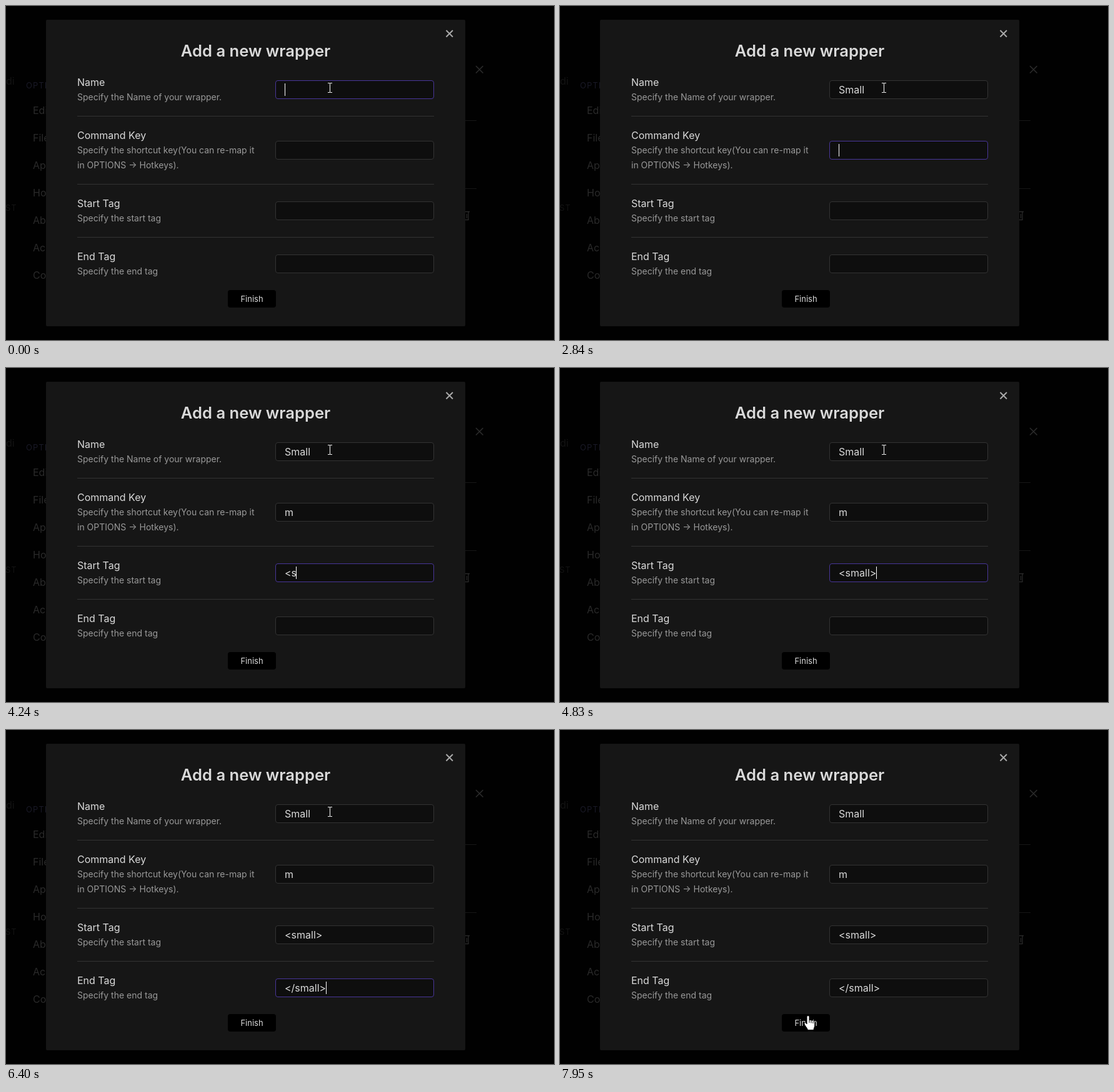
Write an HTML page that moves like this. It is 877 px wide and 535 px high and loops after 8000 ms.

```html
<!DOCTYPE html>
<html lang="en">
<head>
<meta charset="utf-8">
<title>Add a new wrapper</title>
<style>
  html, body { margin: 0; width: 100%; height: 100%; overflow: hidden; background: #010101; }
  svg { display: block; font: 16px Inter, sans-serif; fill: #dadada; }
  text { white-space: pre; }
  .title { font-size: 25.6px; font-weight: 600; }
  .note { font-size: 14px; fill: #999; }
  .line { fill: none; stroke: #333; }
  .field { fill: #0e0e0e; stroke: #333; }
  .focus { stroke: #483699; }
  .back text { fill: #2a2a2a; }
  .back .head { font-size: 13px; letter-spacing: 1px; fill: #191926; }
  .back .faint { fill: #131313; }
  .back path { fill: none; stroke: #2a2a2a; }
  .back .rule { stroke: #171717; }
  .cursor path { fill: #fff; stroke: #000; stroke-linejoin: round; }
</style>
</head>
<body>
<svg width="877" height="535" viewBox="0 0 877 535">
  <g class="back" id="back">
    <text class="faint" x="0" y="126">di</text>
    <text class="head" x="32" y="132">OPTIONS</text>
    <text class="head faint" x="-1" y="328">ST</text>
    <path class="rule" d="M735 183.5H753M735 292.5H753"/>
    <path stroke-width="1.7" d="M752 96l11.500 11.500M763.500 96L752 107.500"/>
    <path stroke-width="1.300" d="M725 329.500H742M727 330V342.500H740V330M737.500 333V340"/>
  </g>
  <rect x="64" y="22" width="671" height="491" rx="2" fill="#161616"/>
  <path d="M704.500 39l10.500 10.500M715 39L704.500 49.500" stroke="#aaa" stroke-width="2"/>
  <text class="title" x="399.500" y="81" text-anchor="middle">Add a new wrapper</text>
  <g id="form"></g>
  <rect x="355" y="455" width="77" height="28" rx="4" fill="#000"/>
  <text x="393.500" y="474" text-anchor="middle" font-size="13">Finish</text>
  <rect id="caret" width="1" height="20" fill="#fff"/>
  <g class="cursor">
    <g id="beam">
      <path stroke="none" style="stroke:none" d="M-3-8H0L.5-7 1-8H4V-7H1V7H4V8H1L.5 7 0 8H-3V7H0V-7H-3z"/>
    </g>
    <g id="arrow">
      <path d="M0 0V16.500L3.700 13 6.200 18.800 8.800 17.700 6.300 12H11.500z"/>
    </g>
    <g id="hand">
      <path d="M-2 1.500a2 2 0 0 1 4 0V7a1.800 1.800 0 0 1 3 .5 1.800 1.800 0 0 1 3 .8 1.600 1.600 0 0 1 2.800 1.300V15c0 3-1.800 4-1.800 7.500H-.5C-1 19.500-6 15-6.200 12c-.1-1.500 2-2 3-.6L-2 13z"/>
      <path d="M2 7v4M5 8v3.500M8 9v3"/>
    </g>
  </g>
</svg>
<script>
const LOOP = 8000, TEXT_X = 446;
const $ = id => document.getElementById(id);

function add(parent, tag, attrs, text = '') {
  const el = document.createElementNS('http://www.w3.org/2000/svg', tag);
  for (const name in attrs) el.setAttribute(name, attrs[name]);
  el.textContent = text;
  return parent.appendChild(el);
}

['Editor', 'Files', 'Appearance', 'Hotkeys', 'About', 'Account', 'Core'].forEach((label, i) =>
  add($('back'), 'text', { x: 43, y: 173 + 44 * i }, label));

const fields = [
  { y: 128, box: 119, value: 'Small', label: 'Name', notes: ['Specify the Name of your wrapper.'] },
  { y: 213, box: 216, value: 'm', label: 'Command Key',
    notes: ['Specify the shortcut key(You can re-map it', 'in OPTIONS → Hotkeys).'] },
  { y: 322, box: 313, value: '<small>', label: 'Start Tag', notes: ['Specify the start tag'] },
  { y: 407, box: 398, value: '</small>', label: 'End Tag', notes: ['Specify the end tag'] }
];

fields.forEach((f, i) => {
  const form = $('form');
  add(form, 'text', { x: 114, y: f.y }, f.label);
  f.notes.forEach((note, n) => add(form, 'text', { class: 'note', x: 114, y: f.y + 23 + 24 * n }, note));
  if (i) add(form, 'path', { class: 'line', d: `M114 ${f.y - 36.5}H685` });
  f.rect = add(form, 'rect', { class: 'field', x: 431.5, y: f.box + .5, width: 253, height: 29, rx: 3.5 });
  f.text = add(form, 'text', { x: TEXT_X, y: f.box + 21 });
});

// Steps: time, focused field, characters typed, caret shown
const typing = (field, start, gap, counts) => counts.map((n, i) => [start + gap * i, field, n, true]);
const steps = [
  [0, 0, 0, true], [310, 0, 0, false],
  [720, 0, 1, true], [1000, 0, 2, true], [1160, 0, 4, true], [1440, 0, 5, true],
  [1720, 1, 0, true], [2280, 1, 0, false], [2840, 1, 0, true], [3250, 1, 1, true],
  [3560, 2, 0, true], ...typing(2, 3960, 147.5, [1, 2, 3, 4, 6]), [4830, 2, 7, true],
  [5110, 3, 0, true], ...typing(3, 5392, 144, [1, 2, 3, 4, 5, 6, 7, 8]),
  [6960, 3, 8, false], [7530, 3, 8, true], [7950, 4, 0, false]
];

// Pointer: time, shape, x, y
const pointer = [
  [0, 'beam', 518, 131], [7100, 'arrow', 503, 194], [7230, 'arrow', 469, 310],
  [7390, 'arrow', 424, 408], [7530, 'hand', 401, 456], [7670, 'hand', 397, 458]
];

const at = (list, t) => list.findLast(item => item[0] <= t);

function draw(t) {
  const [, focus, count, caretOn] = at(steps, t);
  fields.forEach((f, i) => {
    const length = i < focus ? f.value.length : i === focus ? count : 0;
    f.text.textContent = f.value.slice(0, length);
    f.rect.classList.toggle('focus', i === focus);
  });

  const caret = $('caret');
  caret.style.display = caretOn ? '' : 'none';
  if (caretOn) {
    const { text, box } = fields[focus];
    const width = count ? text.getComputedTextLength() : 0;
    caret.setAttribute('x', Math.max(TEXT_X, Math.floor(TEXT_X - .1 + width)));
    caret.setAttribute('y', box + 5);
  }

  const [, shape, x, y] = at(pointer, t);
  for (const id of ['beam', 'arrow', 'hand']) $(id).style.display = id === shape ? '' : 'none';
  $(shape).setAttribute('transform', `translate(${x} ${y})`);
}

const begin = performance.now();
function tick() {
  draw((performance.now() - begin) % LOOP);
  requestAnimationFrame(tick);
}
tick();
</script>
</body>
</html>
```
